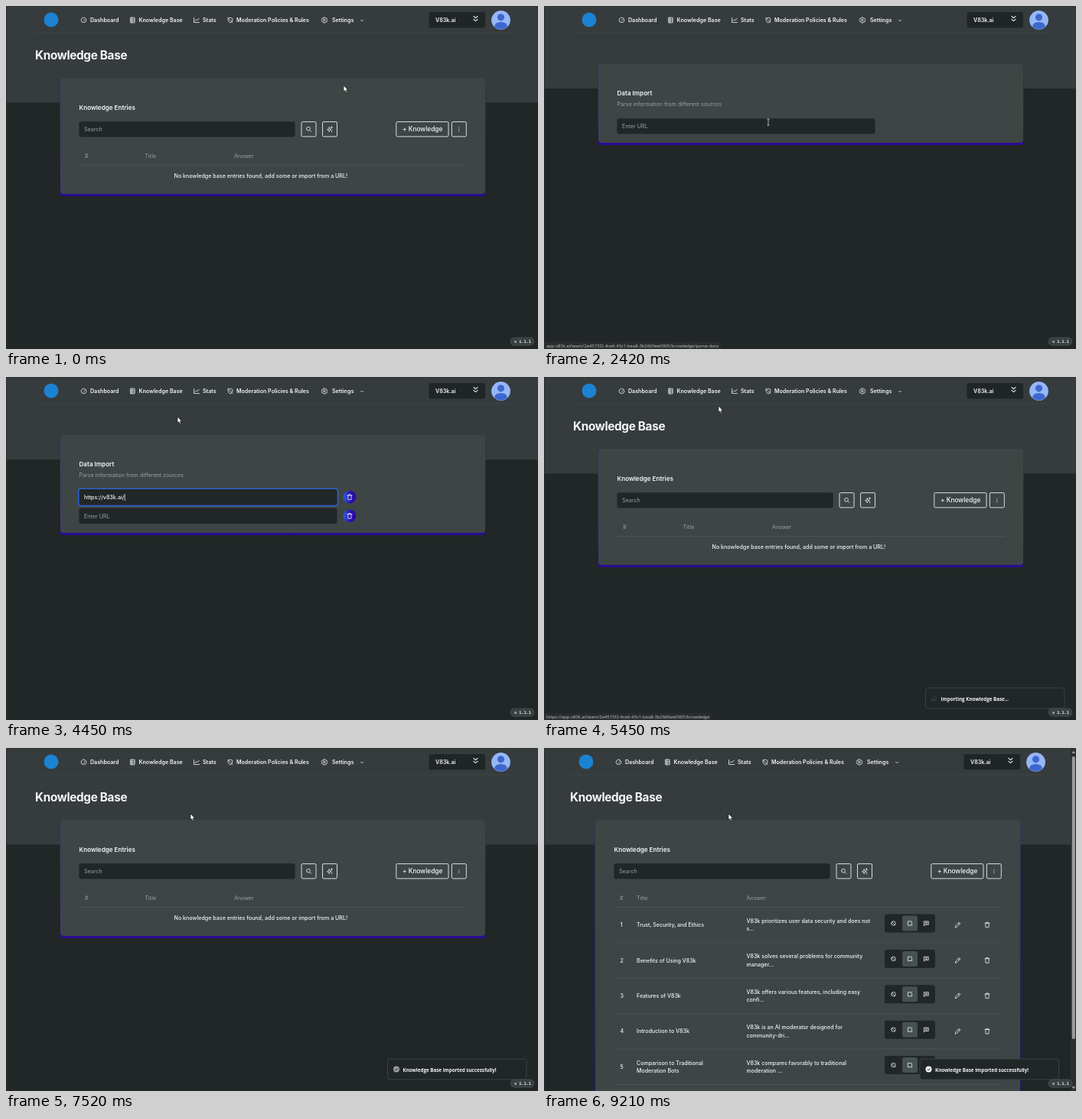
Write an HTML page that moves like this. It is 695x449 px and loops after 9240 ms.

```html
<!DOCTYPE html>
<html lang="en">
<head>
<meta charset="utf-8">
<title>Knowledge Base import</title>
<style>
html, body { margin: 0; width: 100%; height: 100%; overflow: hidden; background: #212627; }
svg { display: block; width: 695px; height: 449px; font: 500 7.13px Inter, sans-serif; fill: #f4f6f6; }
.line { fill: none; stroke: #eef1f1; stroke-width: .8; stroke-linecap: round; stroke-linejoin: round; }
.field { fill: #212627; stroke: #2b3132; stroke-width: .5; }
.button { fill: none; stroke: #eceeee; stroke-width: .9; }
.muted { fill: #9ba1a1; font-weight: 400; }
.system { font-family: "Open Sans", "Noto Sans", sans-serif; }
</style>
</head>
<body>
<svg id="stage" viewBox="0 0 695 449"></svg>
<script>
const LOOP = 9240;
const T = { menu: 970, hover: 1830, parse: 1940, focus: 2850, paste: 3380, link: 4830,
            base: 5000, success: 7470, table: 7850 };
const BRAND = 'V83k', HOST = 'v83k.ai';
const TEAM = `app.${HOST}/team/2e4573f2-4ce6-45c1-bea8-3b2669ee0905/knowledge`;

const text = (x, y, s, attrs = '') => `<text x="${x}" y="${y}" ${attrs}>${s}</text>`;
const rect = (x, y, w, h, attrs = '', r = 2.5) =>
  `<rect x="${x}" y="${y}" width="${w}" height="${h}" rx="${r}" ${attrs}/>`;
const group = (id, body) => `<g id="${id}">${body}</g>`;
const size = (px, weight = 500) => `style="font-size:${px}px;font-weight:${weight}"`;

// Icons are centred on 0,0 in a box about 7 units wide.
const icons = {
  gauge: 'M-2.4 2.5A3.4 3.4 0 1 1 2.4 2.5ZM0 .8L1.6-1',
  book: 'M-2.5-3.4H2.5V3.4H-2.5ZM-2.5-1.1H2.5M-2.5 1.2H2.5M-1-3.4V3.4',
  chart: 'M-3.5-3V3H3.5M-2 1L-.3-1L1 .3L3.3-2.2',
  shield: 'M-2.8-2.2L0-3.4L2.8-2.2V.2Q2.6 2.4 0 3.5Q-2.6 2.4-2.8 .2ZM-3.2-3L3 3',
  gear: 'M-1-3.5H1L1.5-2.3L2.8-2.4L3.7-.8L3 0L3.7 1L2.8 2.5L1.5 2.3L1 3.5H-1L-1.5 2.3L-2.8 2.5L-3.7 1L-3 0L-3.7-.8L-2.8-2.4L-1.5-2.3ZM-1.1 0A1.1 1.1 0 1 0 1.1 0A1.1 1.1 0 1 0-1.1 0',
  down: 'M-1.5-.7L0 .8L1.5-.7',
  twoDown: 'M-2-2.6L0-.8L2-2.6M-2 .4L0 2.2L2 .4',
  search: 'M-3-.6A2.4 2.4 0 1 0 1.8-.6A2.4 2.4 0 1 0-3-.6M1.2 1.2L3.2 3.2',
  sparkle: 'M-.8-2.4L0-.3L2.2 .5L0 1.3L-.8 3.3L-1.5 1.3L-3.5 .5L-1.5-.3ZM2.3-3.5V-1.3M1.2-2.4H3.4M2.6 2V3.4',
  dots: 'M0-1.5V-1.45M0 0V.05M0 1.5V1.55',
  ban: 'M-2.8 0A2.8 2.8 0 1 0 2.8 0A2.8 2.8 0 1 0-2.8 0M-2-2L2 2',
  note: 'M1-2.6H-2.6V2.6H2.6V-.8M1.4-1.6L2.6-2.8',
  chat: 'M-2.8-2.6H2.8V1.8H-1.4L-2.8 3ZM-1.4-1H1.4M-1.4 .4H.8',
  pencil: 'M-3.2 3.2L-2.6 1L1.8-3.3L3.3-1.8L-1 2.6ZM.8-2.3L2.3-.8',
  trash: 'M-3-2.2H3M-1.1-2.2V-3.4H1.1V-2.2M-2.2-2.2L-2 3.4H2L2.2-2.2'
};
const icon = (name, x, y, k = 1) =>
  `<path class="line" transform="translate(${x} ${y}) scale(${k})" d="${icons[name]}"/>`;

const card = (y, h) =>
  rect(70.2, y, 556.5, h + 3, 'fill="url(#edge)"', 4.5) + rect(71, y, 555, h, 'fill="#3e4545"', 4);
const header = h => rect(0, 0, 695, h, 'fill="#363b3d"', 0);
const field = (y, w, label) =>
  rect(95.5, y, w, 20, 'class="field"') + text(102, y + 12.9, label, `class="muted" ${size(7.2, 400)}`);
const button = (x, w, body) => rect(x, 151.6, w, 19.3, 'class="button"', 1.5) + body;
const divider = y => rect(96, y, 506, .7, 'fill="#50585a"', 0);
const bin = y => `<circle cx="449" cy="${y}" r="8.4" fill="url(#bin)"/>` + icon('trash', 449, y);

const nav = [['gauge', 101.5, 110, 'Dashboard'], ['book', 165.5, 173.5, 'Knowledge Base'],
  ['chart', 249, 257, 'Stats'], ['shield', 293, 301, 'Moderation Policies &amp; Rules'],
  ['gear', 416, 426, 'Settings']];
const topBar =
  '<circle cx="59" cy="18" r="9.5" fill="#1c82d2"/>' +
  nav.map(([name, ix, x, s]) => icon(name, ix, 18.5) + text(x, 20.9, s, size(7.1, 600))).join('') +
  icon('down', 465, 19) + rect(39, 34.6, 620, .7, 'fill="#44494c"', 0) +
  rect(552.5, 8, 73.5, 20.5, 'fill="#202526"') + text(561, 20.6, BRAND + '.ai', size(7.1, 600)) +
  icon('twoDown', 613.5, 16.8, 1.3) +
  '<circle cx="646.5" cy="18.4" r="12.4" fill="#96b7f7"/><circle cx="646.5" cy="14.8" r="4.6" fill="#3d67cd"/>' +
  '<path d="M638 27.2Q638.6 21 646.5 21T655 27.2Q646.5 33.6 638 27.2Z" fill="#3d67cd"/>';

const heads = (title, answer) => text(103, 198.8, '#', 'class="muted"') +
  text(title, 198.8, 'Title', 'class="muted"') + text(answer, 198.8, 'Answer', 'class="muted"') + divider(208);

const rows = [
  [['Trust, Security, and Ethics'], [`${BRAND} prioritizes user data security and does not`, 's...']],
  [[`Benefits of Using ${BRAND}`], [`${BRAND} solves several problems for community`, 'manager...']],
  [[`Features of ${BRAND}`], [`${BRAND} offers various features, including easy`, 'confi...']],
  [[`Introduction to ${BRAND}`], [`${BRAND} is an AI moderator designed for`, 'community-dri...']],
  [['Comparison to Traditional', 'Moderation Bots'], [`${BRAND} compares favorably to traditional`, 'moderation ...']]
];
const lines = (x, y, list) =>
  list.map((s, i) => text(x, y + 2.6 + (i - (list.length - 1) / 2) * 10.4, s, size(7.05))).join('');
const row = ([title, answer], i) => {
  const y = 231.5 + i * 46.4;
  return lines(103.5, y, [i + 1]) + lines(125, y, title) + lines(268.5, y, answer) +
    rect(449, y - 14, 66, 24, 'fill="#212627"', 3) + rect(472, y - 12, 20, 20, 'fill="#465153"') +
    icon('ban', 460.5, y - 2) + icon('note', 482, y - 2) + icon('chat', 503.5, y - 2) +
    icon('pencil', 544.5, y) + icon('trash', 583, y) + divider(y + 23);
};

const basePage = header(126.5) + group('shell',
  text(38, 70, 'Knowledge Base', size(15.3, 700) + ' letter-spacing="-.32"') +
  group('shortCard', card(94, 152)) + group('tallCard', card(94, 390)) +
  text(95.5, 135.8, 'Knowledge Entries', size(8.1, 600)) + field(151.3, 282, 'Search') +
  button(386, 19, icon('search', 395.6, 161.3)) + button(413.5, 19, icon('sparkle', 423, 161.3)) +
  button(509.8, 68.2, text(518, 164.3, '+ Knowledge', size(8.3))) +
  button(582.4, 18.9, icon('dots', 591.8, 161.3, 1.4)) +
  group('empty', heads(181.5, 298) +
    text(219.5, 224.5, 'No knowledge base entries found, add some or import from a URL!')) +
  group('table', heads(125, 268.5) + rows.map(row).join('')));

const parsePage = header(108) + group('oneUrl', card(76, 103)) + group('twoUrls', card(76, 128)) +
  text(95.5, 117.4, 'Data Import', size(8.1, 600)) +
  text(95.5, 131.2, 'Parse information from different sources', `class="muted" ${size(7.15, 400)}`) +
  group('focus', rect(94.7, 146.2, 338.8, 22.4, 'fill="#212627" stroke="#2c62cf" stroke-width="1.6"', 3)) +
  group('blank', field(147.2, 337, 'Enter URL')) +
  group('typed', text(102, 160, `https://${HOST}/`, 'id="url"') +
    field(171.8, 337, 'Enter URL') + bin(157.2) + bin(181.8)) +
  rect(0, 153, .8, 9, 'id="caret"', 0);

const menu = rect(552, 173.6, 79.5, 35.8, 'fill="#212627" stroke="#394143" stroke-width=".7"', 2.5) +
  rect(554, 192, 76, 15.8, 'id="active" fill="#465153"', 1.5) +
  text(557.5, 186.2, 'Data Import') + text(557.5, 202.6, 'Knowledge Visibility');

const bars = Array.from({ length: 12 }, (_, i) =>
  `<rect class="bar" x="1.8" y="-.3" width="1.8" height=".6" fill="#9aa0a0" transform="rotate(${i * 30})"/>`).join('');
const toast = rect(498.5, 407, 181.5, 27, 'fill="#212627" stroke="#434a4c" stroke-width=".8"', 3.5) +
  group('busy', `<g transform="translate(509.5 421)">${bars}</g>`) +
  group('done', '<circle cx="510" cy="420.6" r="4"/><path d="M508.2 420.7L509.5 422L511.9 419.3" fill="none" stroke="#212627"/>') +
  text(518.5, 423.5, '', `id="message" class="system" ${size(6.25, 700)}`);

const stage = document.getElementById('stage');
stage.innerHTML = `<defs>
  <linearGradient id="edge" x2="0" y2="1"><stop stop-color="#352f70"/><stop offset="1" stop-color="#2a0b96"/></linearGradient>
  <linearGradient id="bin"><stop stop-color="#315fe0"/><stop offset=".55" stop-color="#2a0fb4"/><stop offset="1" stop-color="#2a0b96"/></linearGradient>
  </defs>` +
  rect(0, 0, 695, 449, 'fill="#212627"', 0) + group('base', basePage) + group('parse', parsePage) +
  group('bar', topBar) + rect(0, 0, 695, .8, 'fill="#2b3031"', 0) + rect(0, 0, .7, 449, 'fill="#2b3031"', 0) +
  group('menu', menu) +
  group('scroll', rect(688, 0, 7, 449, 'fill="#2b2f30"', 0) + rect(689.7, 11, 4.2, 370, 'fill="#9a9d9d"', 2) +
    '<path d="M689.5 7L691.8 3.5L694 7ZM689.5 443L691.8 446.5L694 443Z" fill="#9a9d9d"/>') +
  group('toast', toast) +
  group('version', rect(659, 434, 31, 10.2, 'fill="#3a4042" stroke="#51585a" stroke-width=".6"', 5) +
    text(664, 441.2, 'v 1.1.1', 'style="font:700 5.2px \'DejaVu Sans Mono\',monospace"')) +
  group('status', rect(0, 440, 0, 9, 'id="statusBox" fill="#292d2e"', 1) +
    text(3, 447.3, '', `id="address" class="system" fill="#c2c6c6" ${size(5.87, 400)}`)) +
  '<path id="arrow" d="M0 0V8L1.8 6.5L3.1 9.2L4.5 8.6L3.2 5.9H5.6Z" fill="#fff" stroke="#111" stroke-width=".6"/>' +
  '<path id="beam" d="M-1.6-4H1.6M0-4V4M-1.6 4H1.6" fill="none" stroke="#d5d8d8" stroke-width=".8"/>';

const el = {};
stage.querySelectorAll('[id]').forEach(n => el[n.id] = n);
const spokes = stage.querySelectorAll('.bar');
const show = (id, on) => el[id].style.display = on ? '' : 'none';
const move = (id, x, y) => el[id].setAttribute('transform', `translate(${x} ${y})`);
const clamp = v => Math.max(0, Math.min(1, v));
const put = (id, s) => { if (el[id].textContent !== s) el[id].textContent = s; };

// Pointer stops: time, x, y
const path = [[0, 441, 104], [120, 441, 104], [860, 591, 160], [1080, 591, 160], [1480, 590, 199],
  [1600, 590, 197], [1700, 589, 188], [1800, 588, 183], [1960, 588, 183], [2400, 293, 152],
  [4060, 293, 152], [4450, 224, 52], [4800, 206, 19], [5080, 206, 19], [5450, 228, 38], [5880, 241, 86], [LOOP, 241, 86]];
function pointer(t) {
  const i = path.findIndex(p => p[0] > t), [a, x, y] = path[i - 1], [b, u, v] = path[i];
  const k = (t - a) / (b - a), e = k * k * (3 - 2 * k);
  return [x + (u - x) * e, y + (v - y) * e];
}

function draw(t) {
  const parse = t >= T.parse && t < T.base, full = t >= T.table, pasted = t >= T.paste;
  const focused = t >= T.focus, success = t >= T.success;
  show('base', !parse);
  show('parse', parse);
  for (const id of ['shortCard', 'empty']) show(id, !full);
  for (const id of ['tallCard', 'table', 'scroll']) show(id, full);
  for (const id of ['shell', 'bar']) move(id, full ? -4 : 0, 0);

  show('menu', t >= T.menu && t < T.parse);
  show('active', t >= 1330);
  el.active.setAttribute('y', t < 1740 ? 192 : 175.6);

  for (const id of ['oneUrl', 'blank']) show(id, !pasted);
  for (const id of ['twoUrls', 'typed']) show(id, pasted);
  show('focus', focused);
  show('caret', focused && (!pasted || Math.floor((t - T.paste) / 530) % 2 === 0));
  if (parse) el.caret.setAttribute('x', pasted ? 102.3 + el.url.getComputedTextLength() : 102);

  const toParse = t >= T.hover && t < 2600, toBase = t >= T.link && t < 5650;
  show('status', toParse || toBase);
  if (toParse || toBase) {
    put('address', toParse ? TEAM + '/parse-data' : 'https://' + TEAM);
    el.statusBox.setAttribute('width', el.address.getComputedTextLength() + 6);
    el.status.style.opacity = clamp(((toParse ? 2600 : 5650) - t) / 120);
  }

  const enter = 1 - Math.pow(1 - clamp((t - T.base) / 400), 3);
  show('toast', t >= T.base);
  move('toast', full ? -7.5 : 0, 42 * (1 - enter));
  el.toast.style.opacity = enter;
  show('busy', !success);
  show('done', success);
  el.done.style.opacity = clamp(.4 + (t - T.success) / 300);
  put('message', success ? 'Knowledge Base imported successfully!' : 'Importing Knowledge Base...');
  spokes.forEach((s, i) => s.style.opacity = .1 + .5 * (((i / 12 - t / 1200) % 1 + 1) % 1));

  const [x, y] = pointer(t), beam = parse && x < 433 && y > 146;
  show('arrow', !beam);
  show('beam', beam);
  move(beam ? 'beam' : 'arrow', x, y);
}

const start = performance.now();
(function tick() {
  draw((performance.now() - start) % LOOP);
  requestAnimationFrame(tick);
})();
</script>
</body>
</html>
```
